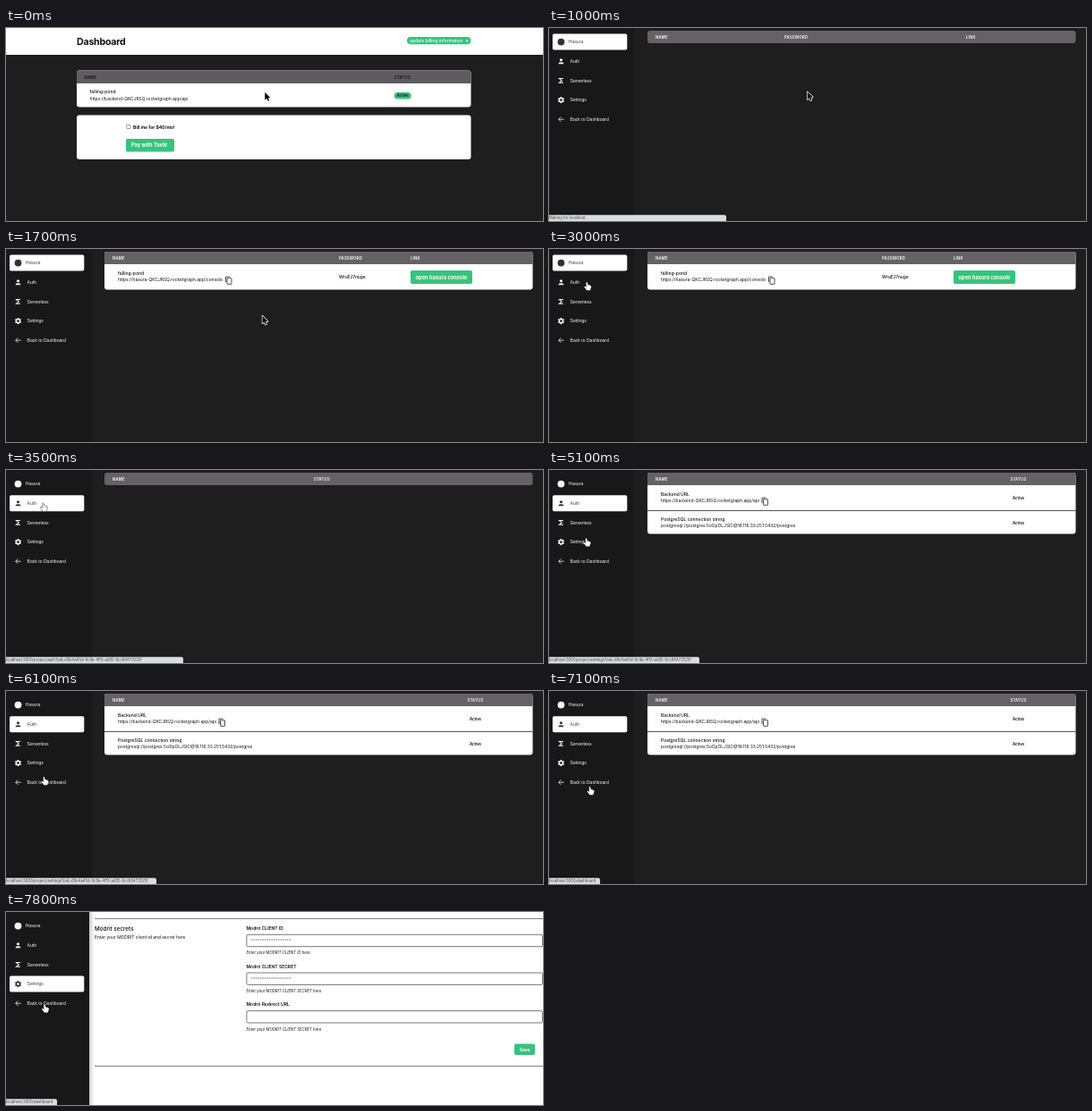
Recreate the animation shown at these times as an HTML page with a canvas. Size 600 by 216 pixels, loop 8000 ms.

```html
<!DOCTYPE html>
<html lang="en">
<head>
<meta charset="utf-8">
<title>Dashboard</title>
<style>
html, body { margin: 0; width: 100%; height: 100%; overflow: hidden; background: #1f1e1f; }
canvas { display: block; width: 600px; height: 216px; }
</style>
</head>
<body>
<canvas id="stage" width="600" height="216"></canvas>
<script>
const ctx = document.getElementById('stage').getContext('2d');
const LOOP = 8000, TICK = 100;
const DARK = '#1f1e1f', SIDE = '#181818', GREEN = '#35c47d', HEAD = '#656265', INK = '#111';
const INTER = 'Inter, sans-serif', ARIAL = '"Liberation Sans", Arial, sans-serif';

function rect(x, y, w, h, color) {
  ctx.fillStyle = color;
  ctx.fillRect(x, y, w, h);
}

function box(x, y, w, h, r, color) {
  ctx.beginPath();
  ctx.roundRect(x, y, w, h, r);
  ctx.fillStyle = color;
  ctx.fill();
}

function frame(x, y, w, h, r, color, width = 0.8) {
  ctx.beginPath();
  ctx.roundRect(x, y, w, h, r);
  ctx.strokeStyle = color;
  ctx.lineWidth = width;
  ctx.stroke();
}

function text(str, x, y, { size = 5, weight = 400, color = INK, family = INTER, style = 'normal', gap = 0 } = {}) {
  ctx.font = `${style} ${weight} ${size}px ${family}`;
  ctx.letterSpacing = gap + 'px';
  ctx.fillStyle = color;
  ctx.fillText(str, x, y);
}

function path(points, close) {
  ctx.beginPath();
  points.forEach(([x, y]) => ctx.lineTo(x, y));
  if (close) ctx.closePath();
}

const heading = (str, x, y, color) => text(str, x, y, { size: 4.28, weight: 600, color, gap: 0.21 });
const badge = (x, y) => text('Active', x, y, { size: 4.28, weight: 600 });

function entry(title, value, y) {
  text(title, 125, y, { weight: 500 });
  text(value, 125, y + 7.6, { size: 4.9 });
}

function button(label, x, y, w, h, pad, size) {
  box(x, y, w, h, 1.8, GREEN);
  text(label, x + pad, y + h / 2 + size * 0.36, { size, weight: 700, color: '#fff' });
}

function copyIcon(x, y) {
  ctx.strokeStyle = '#222';
  ctx.lineWidth = 0.8;
  path([[x + 0.5, y + 6.6], [x + 0.5, y + 0.6], [x + 5, y + 0.6]]);
  ctx.stroke();
  frame(x + 2, y + 2.2, 5, 6.6, 0.5, '#222');
}

// Pages

function dashboard() {
  rect(0, 0, 600, 216, DARK);
  rect(0, 0, 600, 30, '#fff');
  text('Dashboard', 79, 19, { size: 10.7, weight: 700, gap: -0.27 });
  box(448, 10, 71.5, 8.2, 4.1, GREEN);
  text('update billing information', 451, 15.8, { size: 4.9, weight: 500, color: '#fff' });
  path([[514.4, 12.6], [516.6, 14.2], [514.4, 15.8]], true);
  ctx.fillStyle = '#fff';
  ctx.fill();

  box(79, 47.5, 440.5, 41, 3, '#fff');
  box(79, 47.5, 440.5, 14.5, [3, 3, 0, 0], '#5e5c5e');
  heading('NAME', 87.5, 56.5, INK);
  heading('STATUS', 434, 56.5, INK);
  text('falling-pond', 93.5, 73.4, { weight: 500 });
  text('https://backend-QKCJRSQ.rocketgraph.app/api', 93.5, 81, { size: 4.9 });
  box(433.7, 72, 19, 7.6, 3.8, GREEN);
  badge(436.7, 77.4);

  box(79, 97.5, 440.5, 49.5, 3, '#fff');
  frame(134.8, 108.4, 4.2, 4.2, 0.8, '#666', 0.7);
  text('Bill me for $40/mo!', 142, 112.7, { weight: 700 });
  button('Pay with Tavlir', 134, 124, 54, 14.5, 6, 5.7);
}

function table(height, columns) {
  rect(93, 0, 507, 216, DARK);
  if (height > 14) box(110, 3, 478.5, height, 3, '#fff');
  box(110, 3, 478.5, 14, height > 14 ? [3, 3, 0, 0] : 3, HEAD);
  for (const [name, x] of columns) heading(name, x, 11.7, '#fff');
}

function hasura(loaded) {
  if (!loaded) return table(14, [['NAME', 119], ['PASSWORD', 263], ['LINK', 466]]);
  table(42.5, [['NAME', 119], ['PASSWORD', 372], ['LINK', 452]]);
  entry('falling-pond', 'https://hasura-QKCJRSQ.rocketgraph.app/console', 28.8);
  copyIcon(245, 30.5);
  text('WruEJ7nuge', 372, 33.2, { size: 4.9, weight: 500 });
  button('open hasura console', 452, 24, 69, 15, 5.6, 5.7);
}

function auth(loaded) {
  if (!loaded) return table(14, [['NAME', 119], ['STATUS', 344]]);
  table(68.5, [['NAME', 119], ['STATUS', 515.5]]);
  entry('Backend URL', 'https://backend-QKCJRSQ.rocketgraph.app/api', 28.8);
  copyIcon(237.5, 30.5);
  badge(518, 33.4);
  rect(110, 45, 478.5, 0.9, '#444');
  entry('PostgreSQL connection string', 'postgresql://postgres:5oOpOLJSIC@18.116.33.251:5432/postgres', 56.6);
  badge(518, 60.8);
}

function field(label, hint, y, filled) {
  text(label, 268.5, y, { weight: 600 });
  frame(268.9, y + 5.3, 330.6, 13.4, 1.6, '#555');
  if (filled) text('*'.repeat(18), 273.5, y + 14.2, { color: '#777' });
  text(hint, 268.5, y + 27.3, { size: 4.3, style: 'italic' });
}

function settings() {
  rect(93, 0, 507, 216, '#fff');
  rect(99, 7, 501, 0.8, '#666');
  text('Modrit secrets', 99, 21.4, { size: 6.3, weight: 500 });
  text('Enter your MODRIT client id and secret here', 99, 30.4, { size: 4.9 });
  field('Modrit CLIENT ID', 'Enter your MODRIT CLIENT ID here.', 20, true);
  field('Modrit CLIENT SECRET', 'Enter your MODRIT CLIENT SECRET here.', 62.7, true);
  field('Modrit Redirect URL', 'Enter your MODRIT CLIENT SECRET here.', 105.3, false);
  button('Save', 568, 147.5, 23, 12.5, 5.8, 4.9);
  rect(99, 172, 501, 0.8, '#666');
}

// Sidebar

const icons = [
  y => { ctx.beginPath(); ctx.arc(13.5, y, 3.9, 0, 7); ctx.fill(); },
  y => {
    ctx.beginPath();
    ctx.arc(13.5, y - 1.5, 1.6, 0, 7);
    ctx.fill();
    ctx.beginPath();
    ctx.roundRect(10.5, y + 0.9, 6, 2.2, [2.2, 2.2, 0, 0]);
    ctx.fill();
  },
  y => { path([[16, y - 2.4], [11.5, y - 2.4], [14.3, y], [11.5, y + 2.4], [16, y + 2.4]]); ctx.stroke(); },
  y => {
    ctx.lineWidth = 1.5;
    ctx.beginPath();
    ctx.arc(13.5, y, 2.1, 0, 7);
    ctx.stroke();
    for (let i = 0; i < 6; i++) {
      const a = i * Math.PI / 3 + Math.PI / 6, c = Math.cos(a), s = Math.sin(a);
      path([[13.5 + 2.4 * c, y + 2.4 * s], [13.5 + 3.6 * c, y + 3.6 * s]]);
      ctx.stroke();
    }
  },
  y => {
    ctx.lineWidth = 0.8;
    path([[16.6, y], [10.8, y]]);
    ctx.stroke();
    path([[13.4, y - 2.7], [10.7, y], [13.4, y + 2.7]]);
    ctx.stroke();
  }
];
const items = ['Hasura', 'Auth', 'Serverless', 'Settings', 'Back to Dashboard'];

function sidebar(active) {
  const shade = ctx.createLinearGradient(93, 0, 98, 0);
  shade.addColorStop(0, 'rgba(0,0,0,.22)');
  shade.addColorStop(1, 'rgba(0,0,0,0)');
  rect(93, 0, 5, 216, shade);
  rect(0, 0, 93, 216, SIDE);
  items.forEach((label, i) => {
    const y = 15.6 + i * 21.65, on = i === active;
    if (on) box(4, y - 9, 83.3, 18, 1.8, '#fff');
    ctx.fillStyle = ctx.strokeStyle = on ? '#333' : '#f4f4f4';
    ctx.lineWidth = 1.1;
    icons[i](y);
    text(label, i ? 23.5 : 21.8, y + 1.8, { size: 5.1, color: on ? '#444' : '#f4f4f4', family: ARIAL });
  });
}

// Browser status line: start, end, width, label

const PID = '?pid=69e4a45d-9c9a-4ff3-ad35-6cc80472525f';
const statuses = [
  [700, 1100, 198, 'Waiting for localhost...'],
  [3200, 4900, 198, 'localhost:3000/project/auth' + PID],
  [4900, 6900, 168, 'localhost:3000/project/settings' + PID],
  [6900, LOOP, 57, 'localhost:3000/dashboard']
];

function status(t) {
  const s = statuses.find(([from, to]) => t >= from && t < to);
  if (!s) return;
  box(0, 209.3, s[2], 7, [0, 2, 0, 0], '#dcdddf');
  text(s[3], 0, 214.3, { size: 4.2, color: '#444' });
}

// Pointer

const track = [
  [0, 289.3, 72], [600, 289.3, 72], [800, 288.7, 71.4], [1400, 288.7, 71.4],
  [1700, 286.5, 74.8], [2000, 286.5, 74.8], [2900, 42.3, 37], [3200, 42.3, 37],
  [3500, 41.3, 37], [4500, 41.3, 37], [5100, 41.6, 76.3], [5400, 39.5, 84.6],
  [5700, 39.3, 85], [6500, 45.6, 107], [7500, 45.6, 107], [7800, 43, 103.3], [LOOP, 43, 103.3]
];

function pointerAt(t) {
  const i = track.findIndex(k => k[0] > t);
  const [t0, x0, y0] = track[i - 1], [t1, x1, y1] = track[i];
  const u = (t - t0) / (t1 - t0), e = u * u * (3 - 2 * u);
  return [x0 + (x1 - x0) * e, y0 + (y1 - y0) * e];
}

const arrow = [[0, 0], [0, 8.6], [2, 6.8], [3.4, 9.8], [4.8, 9.2], [3.5, 6.3], [6.1, 6.2]];
const hand = [
  [-0.8, 0.7], [0, 0], [0.8, 0.7], [1, 3.2], [2.1, 3], [2.6, 3.6], [3.7, 3.5], [4, 4.2],
  [4.8, 4.4], [5, 5.4], [4.2, 7.6], [3.8, 9.2], [-0.1, 9.2], [-1.4, 7.4], [-3, 5.4],
  [-2.6, 4.7], [-1.6, 5], [-0.6, 6]
];

function pointer(t) {
  const [x, y] = pointerAt(t), isHand = t >= 2900;
  ctx.save();
  ctx.translate(x, y);
  ctx.lineJoin = 'round';
  path(isHand ? hand : arrow, true);
  ctx.lineWidth = isHand ? 0.9 : 1.4;
  ctx.strokeStyle = isHand ? '#111' : '#fff';
  ctx.fillStyle = isHand ? '#fff' : '#000';
  ctx.stroke();
  ctx.fill();
  ctx.restore();
}

function draw(t) {
  if (t < 1000) {
    dashboard();
  } else if (t < 3300) {
    hasura(t >= 1200);
    sidebar(0);
  } else if (t < 7200) {
    auth(t >= 3700);
    sidebar(1);
  } else {
    settings();
    sidebar(3);
  }
  status(t);
  pointer(t);
}

const start = performance.now();
function loop() {
  const t = (performance.now() - start) % LOOP;
  draw(Math.floor(t / TICK) * TICK);
  requestAnimationFrame(loop);
}
loop();
</script>
</body>
</html>
```
